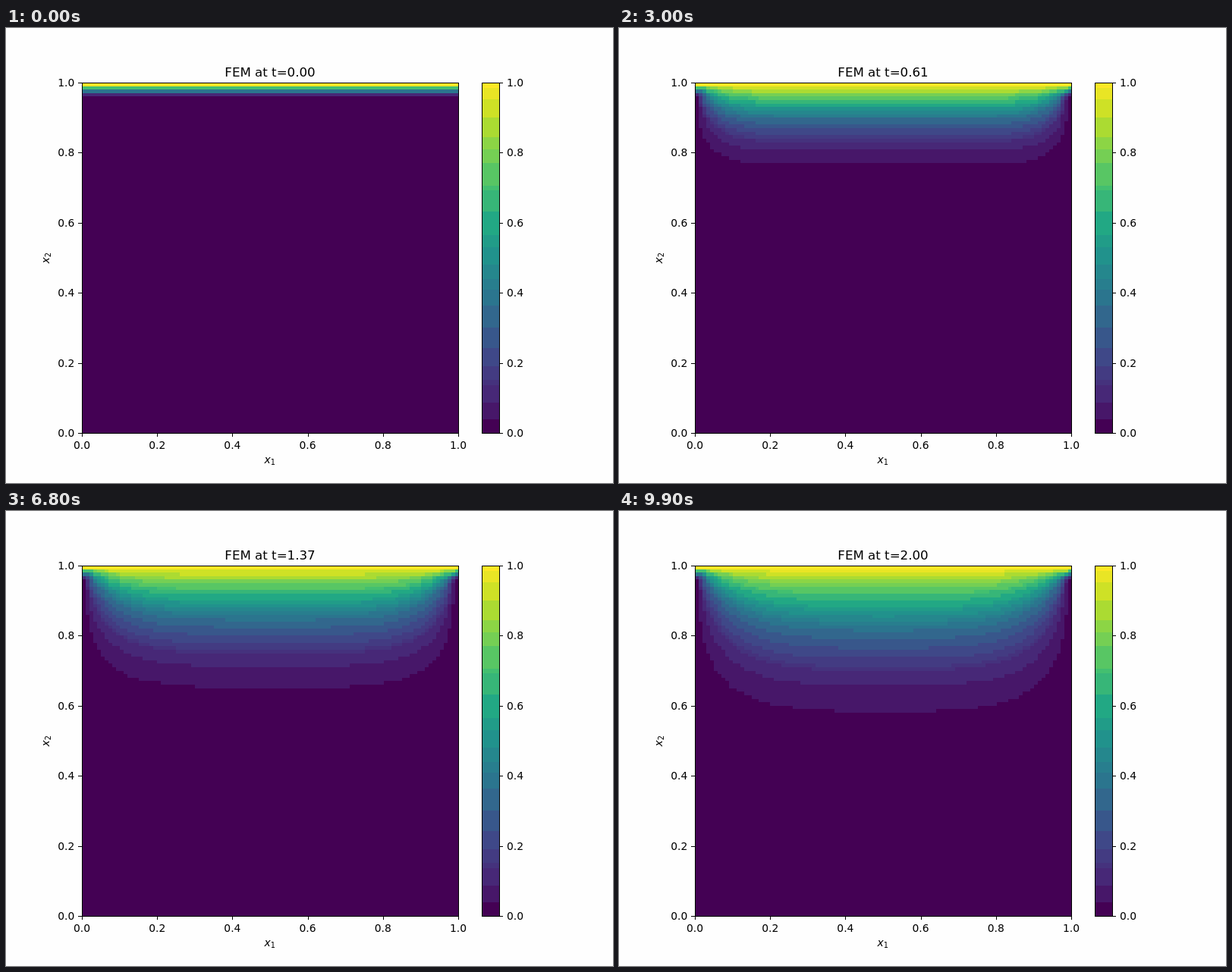
An HTML page with a canvas for the animation above (10000 ms loop, 800 px wide and 600 px high).

```html
<!DOCTYPE html>
<html lang="en">
<head>
<meta charset="utf-8">
<title>Heat field</title>
<style>
  html, body { margin: 0; width: 800px; height: 600px; overflow: hidden; background: #fefefe; }
  canvas, svg { position: absolute; left: 0; top: 0; display: block; }
  text { font-family: "DejaVu Sans", sans-serif; font-size: 13.89px; fill: #000; }
  .title { font-size: 16.67px; }
  .var { font-style: oblique; }
  .sub { font-size: 9.72px; font-style: normal; }
</style>
</head>
<body>
<canvas id="field" width="800" height="600"></canvas>
<svg id="axes" width="800" height="600" viewBox="0 0 800 600"></svg>
<script>
const FRAMES = 100, FRAME_MS = 100, END_TIME = 2;
const MESH = 30, SAMPLES = 100, DIFFUSIVITY = 0.01;
const LEFT = 100, TOP = 72, WIDTH = 497, HEIGHT = 462;
const BAR = { x: 627, width: 23 };

const STOPS = ["440154", "482475", "414487", "355f8d", "2a788e", "21918c",
  "22a884", "44bf70", "7ad151", "bddf26", "fde725"]
  .map(hex => [0, 2, 4].map(i => parseInt(hex.slice(i, i + 2), 16)));
// Upper limits of the visible colour bands
const BANDS = [0.038, 0.087, 0.136, 0.152, 0.19, 0.242, 0.3, 0.363, 0.41, 0.44, 0.48,
  0.53, 0.565, 0.632, 0.692, 0.705, 0.77, 0.81, 0.845, 0.9, 0.953, 0.985, 1];

function viridis(v) {
  const pos = Math.min(Math.max(v, 0), 1) * (STOPS.length - 1);
  const i = Math.min(Math.floor(pos), STOPS.length - 2);
  const mix = STOPS[i].map((c, k) => Math.round(c + (STOPS[i + 1][k] - c) * (pos - i)));
  return `rgb(${mix})`;
}

const BAND_COLORS = BANDS.map((hi, i) =>
  viridis(i === 0 ? 0 : i === BANDS.length - 1 ? 1 : (hi + BANDS[i - 1]) / 2));

function bandColor(v) {
  const i = BANDS.findIndex(hi => v < hi);
  return BAND_COLORS[i < 0 ? BANDS.length - 1 : i];
}

// Linear triangles on a square grid, implicit Euler in time
const ROW = MESH + 1;
const STEP_RATIO = DIFFUSIVITY * END_TIME / (FRAMES - 1) * MESH * MESH;

const cross = (u, p) => u[p - 1] + u[p + 1] + u[p - ROW] + u[p + ROW];
const slant = (u, p) => u[p - ROW - 1] + u[p + ROW + 1];

function eachInner(fn) {
  for (let j = 1; j < MESH; j++)
    for (let i = 1; i < MESH; i++) fn(j * ROW + i);
}

function advance(old) {
  const u = old.slice(), load = new Float64Array(old.length);
  eachInner(p => { load[p] = old[p] / 2 + (cross(old, p) + slant(old, p)) / 12; });
  for (let sweep = 0; sweep < 24; sweep++)
    eachInner(p => {
      u[p] = (load[p] - (1 / 12 - STEP_RATIO) * cross(u, p) - slant(u, p) / 12)
        / (0.5 + 4 * STEP_RATIO);
    });
  return u;
}

const states = [new Float64Array(ROW * ROW).fill(1, MESH * ROW)];
while (states.length < FRAMES) states.push(advance(states[states.length - 1]));

function sample(u, x, y) {
  const i = Math.min(Math.floor(x * MESH), MESH - 1);
  const j = Math.min(Math.floor(y * MESH), MESH - 1);
  const a = x * MESH - i, b = y * MESH - j, p = j * ROW + i;
  const bl = u[p], br = u[p + 1], tl = u[p + ROW], tr = u[p + ROW + 1];
  return a >= b ? bl + a * (br - bl) + b * (tr - br)
                : bl + b * (tl - bl) + a * (tr - tl);
}

const ctx = document.getElementById("field").getContext("2d");
const edgeX = i => Math.round(LEFT + i * WIDTH / SAMPLES);
const edgeY = j => Math.round(TOP + j * HEIGHT / SAMPLES);

function drawField(u) {
  const last = SAMPLES - 1;
  for (let j = 0; j < SAMPLES; j++)
    for (let i = 0; i < SAMPLES; i++) {
      ctx.fillStyle = bandColor(sample(u, i / last, 1 - j / last));
      ctx.fillRect(edgeX(i), edgeY(j), edgeX(i + 1) - edgeX(i), edgeY(j + 1) - edgeY(j));
    }
}

function drawBar() {
  const yOf = v => Math.round(TOP + HEIGHT * (1 - v));
  BANDS.forEach((hi, i) => {
    const y = yOf(hi), bottom = yOf(i ? BANDS[i - 1] : 0);
    ctx.fillStyle = BAND_COLORS[i];
    ctx.fillRect(BAR.x, y, BAR.width, bottom - y);
  });
}

function axesMarkup() {
  const text = (x, y, anchor, s) => `<text x="${x}" y="${y}" text-anchor="${anchor}">${s}</text>`;
  const variable = (place, n) =>
    `<text class="var" ${place}>x<tspan class="sub" dy="2.3">${n}</tspan></text>`;
  const frame = (x, w) =>
    `<rect x="${x + 0.5}" y="${TOP + 0.5}" width="${w}" height="${HEIGHT}" fill="none" stroke="#000"/>`;
  const right = BAR.x + BAR.width;
  let lines = "", labels = "";
  for (let k = 0; k <= 5; k++) {
    const x = Math.round(LEFT + k * 99.2), y = Math.round(TOP + HEIGHT * (1 - k / 5));
    const s = (k / 5).toFixed(1);
    lines += `M${x + 0.5} 534v5M${LEFT} ${y + 0.5}h-5M${right} ${y + 0.5}h5`;
    labels += text(LEFT + k * 99.2, 555, "middle", s)
      + text(90.3, y + 5.2, "end", s) + text(660, y + 5.2, "start", s);
  }
  return frame(LEFT, 496) + frame(BAR.x, BAR.width) + `<path d="${lines}" stroke="#000"/>` + labels
    + variable('x="340.5" y="574"', 1)
    + variable('transform="translate(57 310.5) rotate(-90)"', 2)
    + '<text class="title" id="title" x="348" y="64" text-anchor="middle"></text>';
}

document.getElementById("axes").innerHTML = axesMarkup();
const title = document.getElementById("title");
drawBar();

let shown = -1;
const start = performance.now();

function render(now) {
  const frame = Math.floor(Math.max(0, now - start) / FRAME_MS) % FRAMES;
  if (frame !== shown) {
    shown = frame;
    drawField(states[frame]);
    title.textContent = `FEM at t=${(frame * END_TIME / (FRAMES - 1)).toFixed(2)}`;
  }
  requestAnimationFrame(render);
}
render(start);
</script>
</body>
</html>
```
